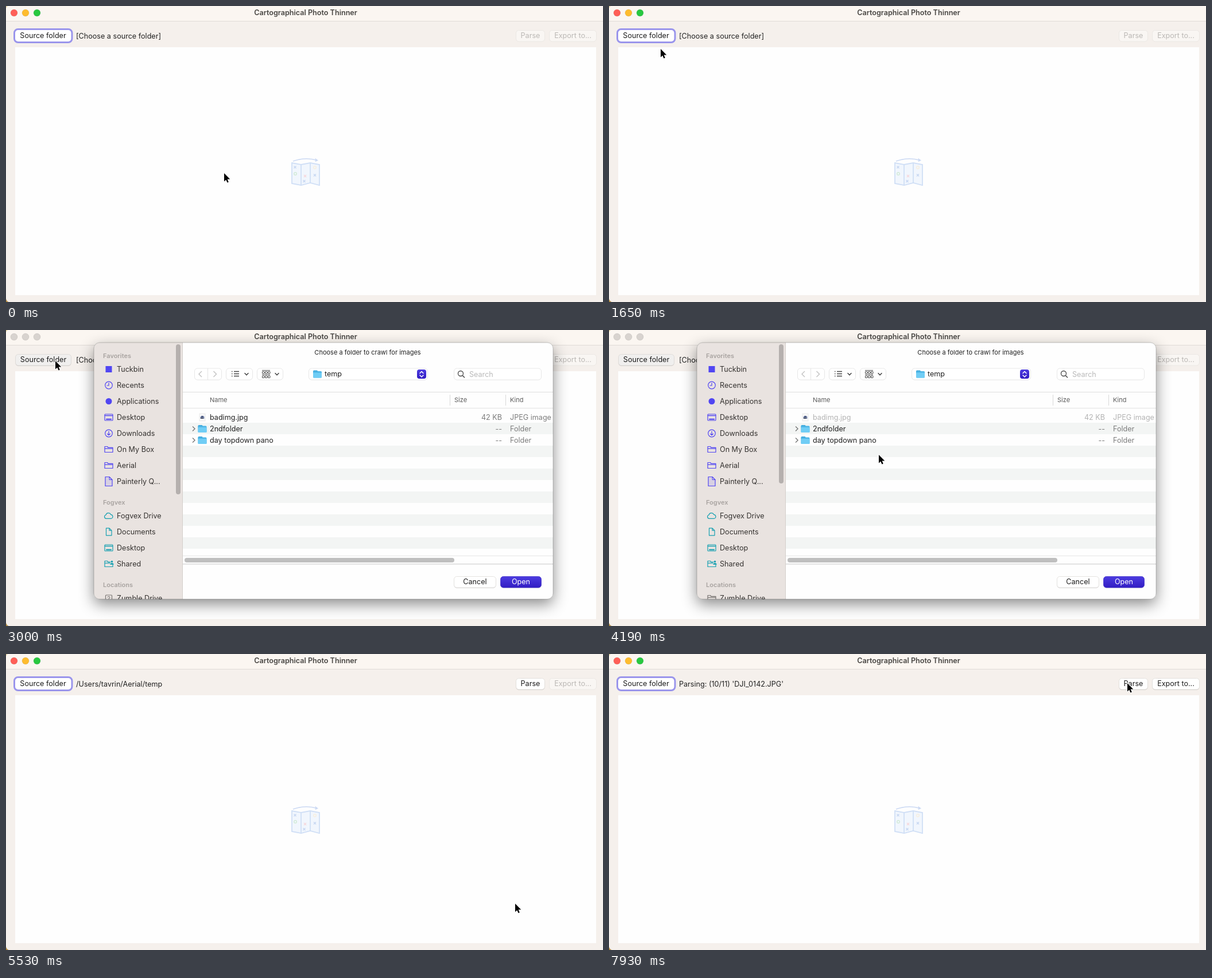
These frames come from a looping animation (1040x517 px, 8 s). An HTML page:

```html
<!DOCTYPE html>
<html lang="en">
<head>
<meta charset="utf-8">
<title>Cartographical Photo Thinner</title>
<style>
  html, body { margin: 0; width: 100%; height: 100%; overflow: hidden; background: #f5f0ec; }
  svg { display: block; width: 100%; height: 100%; }
  text { font: 12.6px Inter, "Open Sans", sans-serif; fill: #222; white-space: pre; }
  .small { font-size: 11px; }
  .heading { font-size: 11px; font-weight: 600; fill: #a8a3a0; }
  .title { font-weight: 600; fill: #474542; }
  .middle { text-anchor: middle; }
  .end { text-anchor: end; }
  .icon { fill: none; stroke-width: 1.2; stroke-linecap: round; stroke-linejoin: round; }
</style>
</head>
<body>
<svg id="stage" viewBox="0 0 1040 517" preserveAspectRatio="none"></svg>
<script>
const LOOP = 8000;
const PRESS = 2400, RELEASE = 2550, OPEN = 3000, SETTLE = 3150, CONFIRM = 5380, CLOSE = 5530;
const PARSE = 7480, DONE = 7930;
const VIOLET = '#5146f2', TEAL = '#16a0b1';

const rect = (x, y, w, h, fill, r = 0, extra = '') =>
  `<rect x="${x}" y="${y}" width="${w}" height="${h}" rx="${r}" fill="${fill}" ${extra}/>`;
const circle = (x, y, r, fill, extra = '') => `<circle cx="${x}" cy="${y}" r="${r}" fill="${fill}" ${extra}/>`;
const line = (d, color, width = 1, extra = '') =>
  `<path d="${d}" fill="none" stroke="${color}" stroke-width="${width}" ${extra}/>`;
const text = (x, y, value, cls = '', color = '') =>
  `<text x="${x}" y="${y}" class="${cls}"${color && ` style="fill:${color}"`}>${value}</text>`;
const during = (from, to, markup) => `<g data-from="${from}" data-to="${to}">${markup}</g>`;
const at = (x, y, markup) => `<g transform="translate(${x} ${y})">${markup}</g>`;

function button(x, y, w, label, style = 'normal') {
  const [fill, edge, ink] = {
    normal: ['#fff', '#dcd8d5', '#1c1c1c'],
    disabled: ['#f9f6f3', '#e6e2df', '#bbb8b5'],
    idle: ['#f0efee', '#d9d6d3', '#1c1c1c'],
    pressed: ['#e6e4e3', '#d0cdca', '#1c1c1c'],
    primary: ['url(#primary)', '#3d2dc6', '#fff'],
    primaryPressed: ['#2f1bb8', '#2a18a6', '#fff'],
  }[style];
  const shadow = style === 'disabled' ? '' : rect(x + .5, y + 1, w - 1, 20, '#0002', 5);
  return shadow + rect(x + .5, y + .5, w - 1, 19.5, fill, 5, `stroke="${edge}" stroke-width=".7"`) +
    text(x + w / 2, y + 14, label, 'middle', ink);
}

const lights = colors => colors.map((c, i) => circle(14 + 20 * i, 12, 6, c, 'stroke="#0002" stroke-width=".6"')).join('');

function mapIcon() {
  const cross = (x, y, c) => line(`M${x - 2} ${y - 2}l4 4m0 -4l-4 4`, c, 1.3);
  const blue = '#c5d6f1';
  return `<path d="M498 274l16 3 16-3 16 3v36l-16-4-16 4-16-3z" fill="#f1f6fd" stroke="#d0dff6" stroke-width="1.8"/>` +
    line('M514 277v36M530 274v35', '#d0dff6', 1.8) +
    line('M500 271Q521 263.500 542 269.500M538.500 266.500l4 3-4 1.800', '#cbd9f3', 1.5) +
    cross(503.5, 281.5, blue) + cross(538, 295.5, blue) + cross(519.5, 306, blue) + cross(521, 297, '#f6d5da') +
    circle(504, 293, 2.3, 'none', 'stroke="#cfe9d4" stroke-width="1.300"') +
    circle(538, 282, 2.3, 'none', 'stroke="#f8eedd" stroke-width="1.300"');
}

function mainWindow() {
  const focused = rect(14.5, 40.5, 100.5, 23, '#fff', 6.5, 'stroke="#9a95ec" stroke-width="3"') +
    text(64.5, 56, 'Source folder', 'middle', '#1c1c1c');
  const source = style => button(16, 42, 98, 'Source folder', style);
  const parse = style => button(888, 42, 51, 'Parse', style);
  const exportTo = style => button(946, 42, 83, 'Export to...', style);
  const status = (from, to, value) => during(from, to, text(122, 57, value));
  const colors = lights(['#ff5f57', '#febc2e', '#28c840']);
  return rect(0, 0, 1040, 517, '#f5f0ec') + rect(0, 0, 1040, 26, '#fbf6f1') + rect(0, 26, 1040, 1, '#dfdad6') +
    '<path d="M0 511q1 5 5 6h-5z" fill="#b18a3e"/><path d="M0 0h3q-2 1-3 4z" fill="#e0cf9d"/>' +
    during(0, OPEN, colors) + during(OPEN, CLOSE, lights(Array(3).fill('#d8d3cf'))) + during(CLOSE, LOOP, colors) +
    text(522, 16, 'Cartographical Photo Thinner', 'title middle') +
    rect(16, 72, 1012, 433, '#fefefe') + mapIcon() +
    during(0, PRESS, focused) + during(PRESS, RELEASE, source('pressed')) +
    during(RELEASE, CLOSE, source('idle')) + during(CLOSE, LOOP, focused) +
    during(0, CLOSE, parse('disabled')) + during(CLOSE, PARSE, parse()) +
    during(PARSE, PARSE + 150, parse('pressed')) + during(PARSE + 150, LOOP, parse()) +
    during(0, DONE, exportTo('disabled')) + during(DONE, LOOP, exportTo()) +
    status(0, CLOSE, '[Choose a source folder]') +
    status(CLOSE, PARSE + 150, '/Users/tavrin/Aerial/temp') +
    [4, 7, 10].map((n, i) => {
      const from = PARSE + 150 * (i + 1);
      return status(from, i < 2 ? from + 150 : LOOP, `Parsing: (${n}/11) 'DJI_0${132 + n}.JPG'`);
    }).join('');
}

// Sidebar glyphs are drawn around their own centre.
const glyphs = {
  square: c => rect(-5.5, -5.5, 11, 11, c),
  disc: c => circle(0, 0, 5.5, c),
  clock: c => circle(0, 0, 6.3, 'none', `stroke="${c}"`) + line('M0 -4V.5H-3', c, 1.2),
  desktop: c => rect(-7, -5.5, 14, 11, 'none', 1, `stroke="${c}"`) + line('M-6.500 -3h13', c, 1.5) + line('M-4 3.300h8', c, 2),
  download: c => circle(0, 0, 6.3, 'none', `stroke="${c}"`) + line('M0 -3.500V3M-2.500 .8L0 3.200 2.500 .8', c, 1.2),
  folder: c => line('M-7 5V-5h4.500l1.500 1.800h8V5zM-7 -1.300H7', c, 1.2),
  page: c => `<path d="M-6 -8h7l5 5V8H-6z" fill="${c}" fill-opacity=".12" stroke="${c}"/>` + line('M1 -8v5h5', c, 1),
  cloud: c => line('M-4.500 4.800a3.200 3.200 0 0 1-.5-6.300A4.500 4.500 0 0 1 3.500 -2.200A3.600 3.600 0 0 1 4.500 4.800z', c, 1.2),
  doc: c => line('M-4.500 -6.300H1l4 4V6.300H-4.500zM1 -6.300v4h4', c, 1.2),
  shared: c => line('M3 -3.200H-1l-1.500-1.800H-7V5H7V1M-7 -1.300H2', c, 1.2) + circle(5.5, -4, 1.7, c) + line('M3 .5q2.500-3 5 0z', c, 1.5),
};

function sidebar() {
  const item = ([icon, label], y, color) =>
    at(179, y - 4.5, `<g class="icon">${glyphs[icon](color)}</g>`) + text(193, y, label, '', '#353230');
  const group = (items, y, color) => items.map((entry, i) => item(entry, y + 28 * i, color)).join('');
  const thumb = h => rect(296, 25, 8, h, '#b5b0ae', 4);
  const unknown = rect(173.5, 463, 11, 12, 'none', 1, 'stroke="#787472" stroke-width="1.200"') +
    text(179, 473, '?', 'small middle', '#787472');
  return rect(153, 22, 154, 448, '#e9e3e0') + rect(307, 22, 1, 448, '#d4cfcc') +
    text(169, 49, 'Favorites', 'heading') +
    group([['square', 'Tuckbin'], ['clock', 'Recents'], ['disc', 'Applications'], ['desktop', 'Desktop'],
      ['download', 'Downloads'], ['folder', 'On My Box'], ['folder', 'Aerial'], ['page', 'Painterly Q...']], 73, VIOLET) +
    text(169, 305, 'Fogvex', 'heading') +
    group([['cloud', 'Fogvex Drive'], ['doc', 'Documents'], ['desktop', 'Desktop'], ['shared', 'Shared']], 329, TEAL) +
    text(169, 449, 'Locations', 'heading') + text(193, 473, 'Zumble Drive', '', '#353230') +
    during(OPEN, SETTLE, unknown + thumb(262)) +
    during(SETTLE, CLOSE, at(179, 468.5, `<g class="icon">${glyphs.folder('#787472')}</g>`) + thumb(243));
}

const folder = (x, y) => rect(x, y, 8, 5, '#3fa9dc', 1.5) + rect(x, y + 1.5, 15, 11.5, '#4db5e6', 1.5) +
  rect(x, y + 4, 15, 9, '#70cdf5', 1.5);
const chevron = (x, y, color) => line(`M${x - 3} ${y - 1.5}l3 3.200 3-3.200`, color, 1.5, 'stroke-linecap="round"');

function toolbar() {
  const field = (x, w) => rect(x + .5, 67.5, w - 1, 20, '#0001', 5) + rect(x + .5, 67, w - 1, 20, '#fff', 5, 'stroke="#e2e2e2" stroke-width=".8"');
  const bars = [0, 1, 2].map(i => line(`M393 ${72.5 + 4 * i}h1.500m2.500 0h9`, '#444', 1.3)).join('');
  const grid = [0, 1].map(row => line(`M446 ${70.5 + 7.5 * row}h14`, '#555', 1) +
    [0, 1, 2].map(col => rect(446.5 + 5 * col, 72.5 + 7.5 * row, 3.5, 3.5, 'none', .5, 'stroke="#444"')).join('')).join('');
  return text(630, 43, 'Choose a folder to crawl for images', 'small middle') +
    field(328, 48) + rect(351, 67, 1, 20, '#e4e4e4') +
    line('M341 72l-5 5 5 5M361.500 72l5 5-5 5', '#c2c2c2', 1.4) +
    field(383, 47) + bars + chevron(419, 77, '#444') + field(437, 46) + grid + chevron(472, 77, '#444') +
    field(527, 208) + folder(535, 70.5) + text(555, 81, 'temp') +
    rect(716, 69, 16, 16, 'url(#primary)', 4) +
    line('M721 75.500l3-3 3 3M721 79l3 3 3-3', '#fff', 1.5, 'stroke-linecap="round"') +
    field(780, 153) + circle(792, 76, 4.5, 'none', 'stroke="#444" stroke-width="1.300"') + line('M795.300 79.500l3.700 3.700', '#444', 1.5) +
    text(807, 82, 'Search', '', '#b9b9b9');
}

function fileList() {
  const row = (y, name, size, kind, ink = '#222', soft = '#7d7d7d') =>
    text(355, y, name, '', ink) + text(864, y, size, 'end', soft) + text(878, y, kind, '', soft);
  const image = (...inks) => row(157, 'badimg.jpg', '42 KB', 'JPEG image', ...inks);
  const folderRow = (y, name) => line(`M325 ${y - 8.500}l4 4-4 4`, '#777', 1.4) + folder(334.5, y - 11) + row(y, name, '--', 'Folder');
  const heads = [[355, 'Name'], [781, 'Size'], [878, 'Kind']].map(([x, label]) => text(x, 126, label, 'small', '#5c5c5c')).join('');
  const stripes = [0, 1, 2, 3, 4, 5].map(i => rect(308, 162 + 40 * i, 645, 20, '#f3f5f4')).join('');
  const preview = rect(337, 146, 10, 13, '#f8f8f8', 0, 'stroke="#ddd" stroke-width=".6"') +
    rect(338.5, 151, 7, 4, '#8b9ac0') + rect(340, 150, 4, 2, '#45527a') + rect(339, 153, 5, 1.5, '#2f3444');
  return rect(308, 108, 645, 1, '#dedede') + heads + rect(773, 113, 1, 19, '#d8d8d8') + rect(870, 113, 1, 19, '#d8d8d8') +
    rect(308, 136, 645, 1, '#e2e2e2') + stripes + preview +
    during(OPEN, SETTLE, image()) + during(SETTLE, CLOSE, image('#b4b4b4', '#b4b4b4')) +
    folderRow(177, '2ndfolder') + folderRow(197, 'day topdown pano') +
    rect(308, 394, 645, 1, '#e6e6e6') + rect(311, 398, 470, 8, '#bfbfbf', 4) + rect(308, 408, 645, 1.5, '#d9d9d9');
}

const dialog = () => rect(153, 22, 800, 448, '#fff', 10, 'filter="url(#shadow)"') +
  `<g clip-path="url(#sheet)">${rect(153, 22, 800, 448, '#fefefe')}${sidebar()}${toolbar()}${fileList()}</g>` +
  button(780, 430, 74, 'Cancel') + during(OPEN, CONFIRM, button(861, 430, 72, 'Open', 'primary')) +
  during(CONFIRM, CLOSE, button(861, 430, 72, 'Open', 'primaryPressed')) +
  rect(153, 22, 800, 448, 'none', 10, 'stroke="#0004" stroke-width=".8"');

const click = (from, x, y) => during(from, from + 150,
  circle(x, y, 9, 'none', 'stroke="#fff" stroke-width="3"') + circle(x, y, 9.3, 'none', 'stroke="#000" stroke-width="1.300"'));

document.getElementById('stage').innerHTML = `
  <defs>
    <linearGradient id="primary" x2="0" y2="1"><stop stop-color="#4c3ce0"/><stop offset="1" stop-color="#321dc3"/></linearGradient>
    <filter id="shadow" x="-10%" y="-15%" width="120%" height="130%">
      <feDropShadow dx="0" dy="9" stdDeviation="13" flood-opacity=".45"/>
    </filter>
    <clipPath id="sheet">${rect(153, 22, 800, 448, '#000', 10)}</clipPath>
  </defs>
  ${mainWindow()}${during(OPEN, CLOSE, dialog())}
  ${click(PRESS, 87, 53)}${click(CONFIRM, 888.5, 436)}${click(PARSE, 904, 51)}
  <path id="pointer" d="M0 0v14.500l3.300-3.100 2.200 5 2.300-1-2.200-4.900h4.700z" stroke="#fff" stroke-width="1.800" paint-order="stroke" stroke-linejoin="round"/>`;

// Each stroke starts at a time and advances one point per 149 ms.
const TICK = 149;
const strokes = [
  [0, [[380, 292]]],
  [300, [[396, 303], [462, 349], [491, 366], [440, 334], [330, 264], [210, 186], [128, 133]]],
  [1350, [[112, 110], [98, 89], [90, 75], [88, 67], [87, 60], [86, 56], [86, 54]]],
  [3600, [[110, 67], [215, 116], [365, 178], [470, 218], [508, 230]]],
  [4490, [[530, 239], [610, 278], [720, 342], [810, 396], [865, 426], [887, 436]]],
  [6280, [[884, 412], [876, 325], [880, 190], [897, 85], [903, 51]]],
];

function pointerAt(t) {
  const [start, points] = strokes.findLast(([from]) => from <= t);
  return points[Math.min(points.length - 1, Math.floor((t - start) / TICK))];
}

const pointer = document.getElementById('pointer');
const timed = [...document.querySelectorAll('[data-from]')];

function draw() {
  const t = performance.now() % LOOP;
  for (const part of timed) {
    const { from, to } = part.dataset;
    part.style.display = t >= +from && t < +to ? '' : 'none';
  }
  pointer.setAttribute('transform', `translate(${pointerAt(t).join(' ')})`);
  requestAnimationFrame(draw);
}
draw();
</script>
</body>
</html>
```
